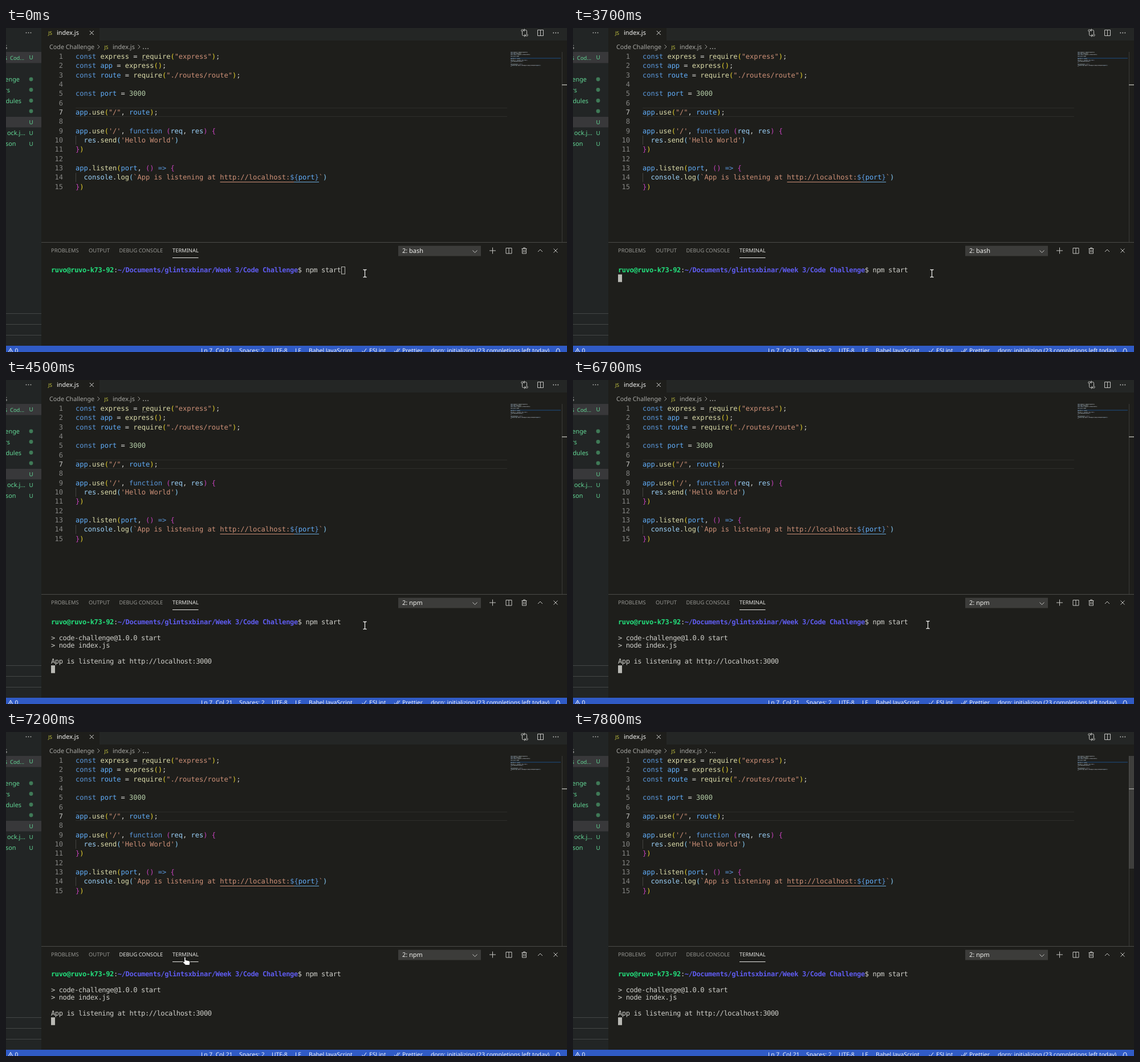
Animation, 984 px wide and 569 px high, one loop 8 s. Source, as an HTML page:

```html
<!DOCTYPE html>
<html lang="en">
<head>
<meta charset="utf-8">
<title>Starting a server</title>
<style>
html, body { margin: 0; height: 100%; overflow: hidden; background: #1e1e1b; }
svg { display: block; width: 984px; height: 569px; }
text { white-space: pre; text-rendering: geometricPrecision; font: 10.8px "Noto Sans", "Open Sans", sans-serif; }
.mono text { font: 12.03px "DejaVu Sans Mono", monospace; }
.term text { letter-spacing: -.364px; fill: #cfcfca; }
.term .bold { font-weight: 700; }
.line { fill: none; stroke: #c5c5c2; stroke-width: 1; }
</style>
</head>
<body>
<svg id="stage" viewBox="0 0 984 569"></svg>
<script>
const stage = document.getElementById('stage');
const rect = (x, y, w, h, fill, more = '') =>
  `<rect x="${x}" y="${y}" width="${w}" height="${h}" fill="${fill}" ${more}/>`;
const text = (x, y, str, fill, size = 10.8, more = '') =>
  `<text x="${x}" y="${y}" fill="${fill}" style="font-size:${size}px" ${more}>${str}</text>`;
const icon = (d, more = '') => `<path class="line" d="${d}" ${more}/>`;
const dots = (x, y, gap = 4, r = .9, fill = '#c5c5c2') =>
  [0, 1, 2].map(i => `<circle cx="${x + i * gap}" cy="${y}" r="${r}" fill="${fill}"/>`).join('');

// Code: each piece starts with a colour letter
const colors = {
  w: '#d4d4d0', k: '#5a98dc', f: '#dcdcaa', c: '#61aefa', v: '#9cd2fa', s: '#ce9178',
  n: '#b5cea8', y: '#e6d22e', m: '#c742bd', b: '#87cefa'
};
const code = [
  'kconst |fexpress|w = |frequire|y(|s"express"|y)|w;',
  'kconst |capp|w = |fexpress|y()|w;',
  'kconst |croute|w = |frequire|y(|s"./routes/route"|y)|w;',
  '',
  'kconst |cport|w = |n3000',
  '',
  'capp|w.|fuse|y(|s"/"|w, |croute|y)|w;',
  '',
  'capp|w.|fuse|y(|s\'/\'|w, |kfunction |m(|vreq|w, |vres|m) {',
  'w  |vres|w.|fsend|b(|s\'Hello World\'|b)',
  'm}|y)',
  '',
  'capp|w.|flisten|y(|cport|w, |m()|k => |m{',
  'w  |vconsole|w.|flog|b(|s`App is listening at http://localhost:|k${|cport|k}|s`|b)',
  'm}|y)'
];
const pitch = 16.36;
const baseline = i => 53.8 + i * pitch;
const piece = p => `<tspan fill="${colors[p[0]]}">${p.slice(1)}</tspan>`;
const codeLines = code.map((l, i) => l &&
  `<text x="122" y="${baseline(i)}">${l.split('|').map(piece).join('')}</text>`).join('');
const numbers = code.map((_, i) =>
  `<text x="100" y="${baseline(i)}" text-anchor="end" fill="${i == 6 ? '#c6c6c3' : '#858583'}">${i + 1}</text>`).join('');

const editor = `<g class="mono">
  ${icon('M122 140.5H879M122 155.5H879', 'style="stroke:#2d2d2a"')}
  ${icon('M122.5 189V205M122.5 254.5V270.5', 'style="stroke:#434340"')}
  ${numbers}<g id="code">${codeLines}</g>
  ${icon('M375.5 270.5H505', 'style="stroke:#ce9178"')}${icon('M505 270.5H549', 'style="stroke:#6aa9da"')}
  ${dots(239.8, 56, 2.9, .7, '#a8a8a4')}
  ${rect(885, 52.4, 88, 1.4, '#1d4066')}
  <use href="#code" stroke="#8c98a2" stroke-width="2.5" transform="translate(870.5 37.6) scale(.119 .105)"/>
</g>
${rect(975, 42, 1, 334, '#3b3b38')}${rect(975, 99, 9, 1.6, '#a2a29d')}
${rect(975, 42, 9, 198, '#797979', 'id="slider" fill-opacity=".35"')}`;

const js = (x, y) => text(x, y, 'JS', '#cbcb41', 8.6, 'font-weight="700"');
const header = `
${rect(164, 0, 820, 22, '#242625')}
${js(74, 11.5)}${text(89, 12, 'index.js', '#f4f4f2', 10.9)}
${icon('M146.8 5l7 7m0 -7l-7 7', 'style="stroke:#dededb"')}
${text(76, 37, 'Code Challenge', '#a9a9a5', 10.75)}${icon('M160.5 29.5l3.5 3.5l-3.5 3.5', 'style="stroke:#a0a09c"')}
${js(172.5, 36.5)}${text(187, 37, 'index.js', '#a9a9a5', 10.9)}
${icon('M231.5 29.5l3.5 3.5l-3.5 3.5', 'style="stroke:#a0a09c"')}${dots(241, 36.2, 4, .9, '#a9a9a5')}
${icon('M905.5 6.5V11.5q0 2 2 2H911M909 11l2.3 2.5l-2.3 2M913.5 10V5.5q0 -2 -2 -2H908M910 1.5l-2.3 2l2.3 2.5')}
<circle class="line" cx="905.5" cy="4.5" r="1.7"/><circle class="line" cx="913.5" cy="12.5" r="1.7"/>
${icon('M932.5 3.5h10v10h-10zM937.5 3.5v10')}${dots(960.3, 8.5)}`;

// Sidebar rows: y, label, right edge, badge
const rows = [
  [90, 'enge', 24], [108.5, 'rs', 7], [127.5, 'dules', 27], [146, '', 0],
  [165, '', 0, 'U'], [184, 'ock.j...', 34, 'U'], [203, 'son', 17.5, 'U']
];
const green = '#62d695';
const badge = y => text(40.6, y + 3.8, 'U', green, 9.8, 'font-weight="600"');
const sidebar = `${rect(0, 0, 62, 558, '#222525')}
${rect(0, 42, 62, 19.5, '#38383a')}${rect(0, 156, 62, 18.5, '#38383a')}
${dots(35.5, 8.3)}${text(-3, 36.5, 'S', '#c8c8c5', 9.4)}
${text(-3, 55.5, 's', green, 10.5)}${text(7, 55.7, 'Cod...', green, 9.4)}${badge(51.5)}
${rows.map(([y, label, end, mark]) => text(end, y + 4, label, green, 10.9, 'text-anchor="end"') +
  (mark ? badge(y) : `<circle cx="44" cy="${y}" r="3.4" fill="#3f7a57"/>`)).join('')}
${icon('M0 501.5H62M0 520.5H62M0 539.5H62', 'style="stroke:#444746"')}`;

const tab = (x, label, more = '', fill = '#969692') => text(x, 394.4, label, fill, 9.35, more);
const panel = `${rect(62, 376, 922, 1, '#4a4a47')}
${tab(79, 'PROBLEMS')}${tab(145, 'OUTPUT')}${tab(198.5, 'DEBUG CONSOLE', 'id="debug"')}${tab(292, 'TERMINAL', '', '#e7e7e4')}
${rect(292, 403, 45.5, 1, '#e7e7e4')}
${rect(688, 382.5, 145, 18, '#3c3c3a')}
${text(695, 395.1, '2: bash', '#f0f0ed', 10.95, 'id="shell"')}
${icon('M818.5 390.5l4 4l4 -4M848 391h11M853.5 385.5v11M877 386.5h10v9.5h-10zM882 386.5v9.5')}
${icon('M904.5 387.5h9M907.5 387.5v-1.5h3v1.5M905.5 387.5v8.5h7v-8.5M907.7 389.5v4.5M910.3 389.5v4.5')}
${icon('M933 393l4 -4l4 4M960.5 387.5l7 7m0 -7l-7 7')}`;

const row = i => 429 + i * 13.75;
const output = [[2, '&gt; code-challenge@1.0.0 start'], [3, '&gt; node index.js'],
  [5, 'App is listening at http://localhost:3000']];
const terminal = `<g class="mono term">
<text x="79" y="${row(0)}"><tspan class="bold" style="fill:#23df7c">ruvo@ruvo-k73-92</tspan>:<tspan class="bold" style="fill:#5f5cf0">~/Documents/glintsxbinar/Week 3/Code Challenge</tspan>$ npm start</text>
${output.map(([i, str]) => `<text class="out" x="79" y="${row(i)}">${str}</text>`).join('')}
</g><rect id="caret" stroke="#b9b9b4"/>`;

const status = [[342, 'Ln 7, Col 21'], [409, 'Spaces: 2'], [466, 'UTF-8'], [507, 'LF'], [531, 'Babel JavaScript'],
  [637, 'ESLint'], [695, 'Prettier'], [745, 'dorn: initializing (23 completions left today)'], [15.5, '0']];
const footer = rect(0, 558, 984, 11, '#305bc6') +
  status.map(([x, str]) => text(x, 570, str, '#f5f7fc', 10.25)).join('') +
  icon('M3.5 570.5l4.5 -8l4.5 8zM8 565.5v3M624.5 567l2.5 3l5 -7M681 567l2.5 3l4.5 -7M686 569.5l5 -6.5M964 570q1.5 -1.5 1.5 -4q0 -3 2.7 -3t2.7 3q0 2.5 1.5 4', 'style="stroke:#f5f7fc"');

// Pointers, with their hot spot at 0,0
const shape = (d, fill, stroke, width) =>
  `<path d="${d}" fill="${fill}" stroke="${stroke}" stroke-width="${width}" stroke-linejoin="round"/>`;
const beamPath = 'M-3 -6.5H-1L0 -5.5L1 -6.5H3M0 -5.5V5.5M-3 6.5H-1L0 5.5L1 6.5H3';
const pointers = `
<g id="beam">${shape(beamPath, 'none', '#0c0c0a', 3)}${shape(beamPath, 'none', '#f4f4f2', 1.3)}</g>
<g id="hand">${shape('M-1.5 6V-1q0 -1.3 1.3 -1.3t1.3 1.3V3L7 4.2q2 .6 1.8 2.6L8 12H1L-3 8q-1.5 -2 .2 -2.5z', '#fff', '#111', 1)}</g>
<g id="arrow">${shape('M0 0V13L3 10L5 14.5L7 13.5L5 9.5H9Z', '#111', '#fff', 1)}</g>`;

stage.innerHTML = rect(0, 0, 984, 569, '#1e1e1b') + editor + header + sidebar + panel + terminal + footer + pointers;

const get = id => document.getElementById(id);
const attrs = (el, map) => Object.entries(map).forEach(([k, v]) => el.setAttribute(k, v));
const show = (el, on) => el.setAttribute('visibility', on ? 'visible' : 'hidden');
const outs = [...document.querySelectorAll('.out')];

// Pointer poses: start time, kind, x, y
const poses = [
  [0, 'beam', 629.5, 431], [6700, 'beam', 622.5, 430], [6800, 'beam', 590, 428], [6900, 'beam', 505, 422],
  [7000, 'beam', 400, 415], [7200, 'hand', 314, 397.5], [7300, 'beam', 255, 365], [7400, 'beam', 190, 330],
  [7500, 'beam', 120, 298], [7600, 'arrow', 48, 270], [7700, 'arrow', 4, 255], [7800, 'none', 0, 0]
];

function draw(t) {
  const [, kind, x, y] = poses.findLast(p => p[0] <= t);
  for (const id of ['beam', 'hand', 'arrow']) {
    show(get(id), id == kind);
    attrs(get(id), { transform: `translate(${x} ${y})` });
  }
  const line = t < 3700 ? 0 : t < 4400 ? 1 : t < 4500 ? 5 : 6;
  attrs(get('caret'), {
    x: line ? 79.5 : 588.5, y: 419.5 + line * 13.7, width: 6, height: 12.5,
    fill: t < 500 ? 'none' : '#b9b9b4'
  });
  outs.forEach((el, i) => show(el, t >= (i < 2 ? 4400 : 4500)));
  get('shell').textContent = t < 3900 ? '2: bash' : '2: npm';
  attrs(get('debug'), { fill: t >= 7200 && t < 7300 ? '#e7e7e4' : '#969692' });
  attrs(get('slider'), { opacity: t < 7300 ? 0 : t < 7400 ? .5 : 1 });
}

const start = performance.now();
function tick() {
  draw((performance.now() - start) % 8000);
  requestAnimationFrame(tick);
}
tick();
</script>
</body>
</html>
```
